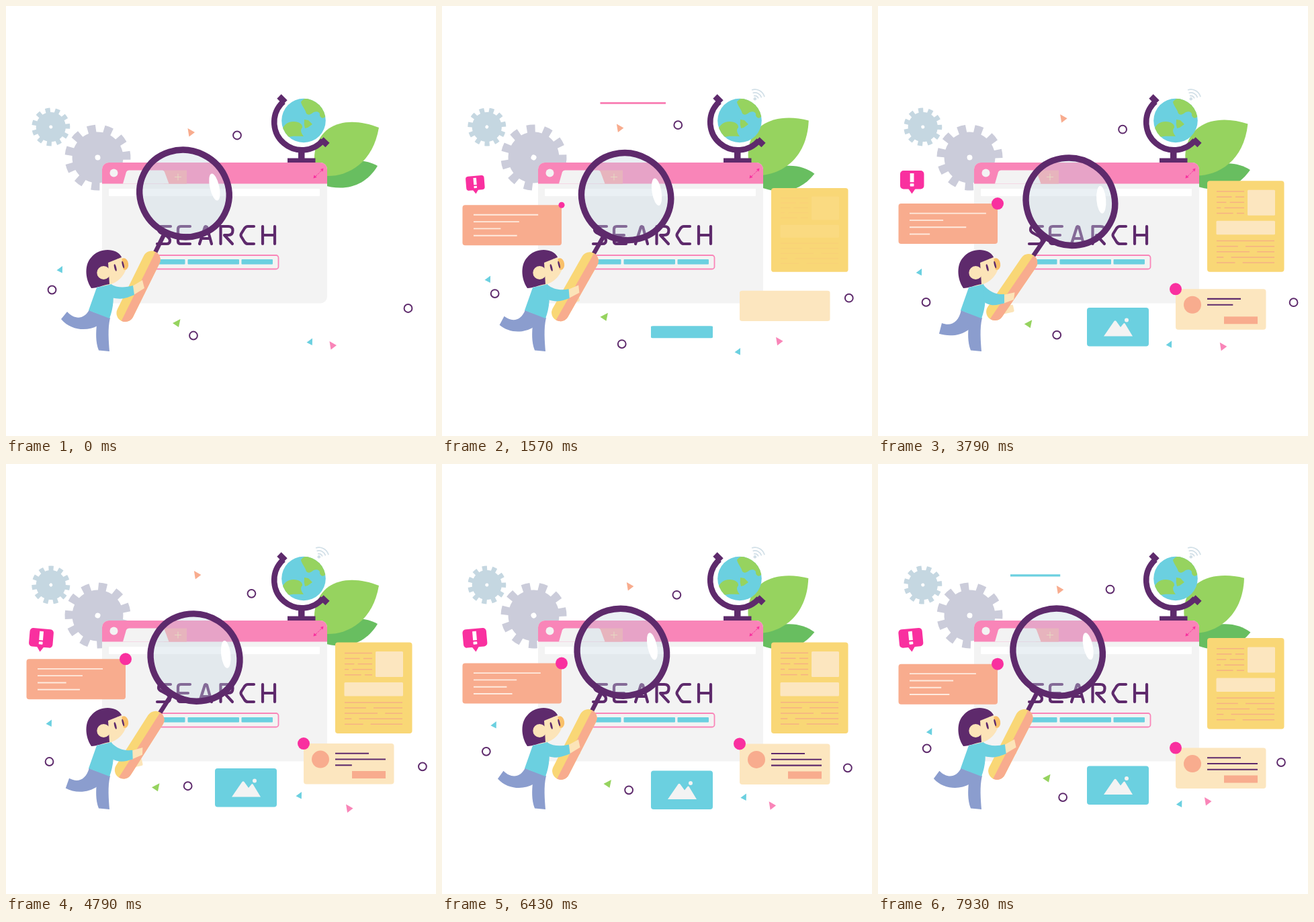
Animation, 640 px wide and 640 px high, one loop 8000 ms. Source, as an HTML page with a canvas:

```html
<!DOCTYPE html>
<html lang="en">
<head>
<meta charset="utf-8">
<title>Search illustration</title>
<style>
html, body { margin: 0; width: 100%; height: 100%; overflow: hidden; background: #fff; }
canvas { display: block; width: 100vw; height: 100vh; }
</style>
</head>
<body>
<canvas id="stage"></canvas>
<script>
// Every cycle is built on the same 2.4 s beat
const LOOP = 8, BEAT = 2.4, SWAY = BEAT * 2, DRIFT = BEAT * 3, TAU = Math.PI * 2;
const PLUM = '#5e2a6c', PINK = '#f985b8', HOT = '#f9309f', CYAN = '#6bd0e0', GREEN = '#96d35f',
  PEACH = '#f8ac8e', YELLOW = '#f9d776', CREAM = '#fce6bf', SKIN = '#fce4b8', PALE = '#f3f3f3',
  MIST = '#c5d7e1', DENIM = '#8b9dce';

const canvas = document.getElementById('stage');
const ctx = canvas.getContext('2d');
const dpr = window.devicePixelRatio || 1;
canvas.width = canvas.height = 640 * dpr;

// Timing helpers
const mix = (a, b, k) => a + (b - a) * k;
const ramp = (t, start, dur) => Math.min(1, Math.max(0, (t - start) / dur));
const ease = (t, start, dur) => { const p = ramp(t, start, dur); return p * p * (3 - 2 * p); };
const wave = (t, peak, period = SWAY) => Math.cos(TAU * (t - peak) / period);

// Smooth closed path through three points, one beat apart
function drift(points, t) {
  const i = Math.floor(t / BEAT), p = t / BEAT - i;
  const from = points[i % 3], to = points[(i + 1) % 3], other = points[(i + 2) % 3];
  const a = 1 - 2.5 * p * p + 1.5 * p ** 3, b = (p + 4 * p * p - 3 * p ** 3) / 2;
  return [0, 1].map(k => a * from[k] + b * to[k] + (1 - a - b) * other[k]);
}

// Drawing helpers
function shape(color, d) { ctx.fillStyle = color; ctx.fill(new Path2D(d)); }
function stroke(color, width, d, cap = 'butt') {
  ctx.strokeStyle = color; ctx.lineWidth = width; ctx.lineCap = cap; ctx.lineJoin = 'round';
  ctx.stroke(new Path2D(d));
}
function arc(color, width, x, y, r, from = 0, to = TAU) {
  ctx.strokeStyle = color; ctx.lineWidth = width; ctx.lineCap = 'butt';
  ctx.beginPath(); ctx.arc(x, y, r, from, to); ctx.stroke();
}
function oval(color, x, y, rx, ry = rx, rot = 0) {
  ctx.fillStyle = color;
  ctx.beginPath(); ctx.ellipse(x, y, rx, ry, rot, 0, TAU); ctx.fill();
}
function box(color, x, y, w, h, r = 0) {
  ctx.fillStyle = color;
  ctx.beginPath(); ctx.roundRect(x, y, w, h, r); ctx.fill();
}
function rule(color, width, x1, x2, y) { if (x2 > x1) stroke(color, width, `M${x1} ${y}H${x2}`); }
function group(draw, x = 0, y = 0, rot = 0, sx = 1, sy = sx) {
  ctx.save(); ctx.translate(x, y); ctx.rotate(rot * Math.PI / 180); ctx.scale(sx, sy);
  draw(); ctx.restore();
}
function faded(alpha, draw) { ctx.globalAlpha = alpha; draw(); ctx.globalAlpha = 1; }

function gear(color, x, y, outer, hole, rot) {
  const teeth = 11, inner = outer * 0.775, root = 0.155, tip = 0.135;
  group(() => {
    ctx.fillStyle = color;
    ctx.beginPath();
    for (let i = 0; i < teeth; i++) {
      const a = i * TAU / teeth - TAU / 4;
      ctx.arc(0, 0, outer, a - tip, a + tip);
      ctx.arc(0, 0, inner, a + root, a + TAU / teeth - root);
    }
    ctx.fill();
    oval('#fff', 0, 0, hole);
  }, x, y, rot);
}

function leaves(t) {
  const lean = 4.85 * (1 - wave(t, 0));
  group(() => shape('#68be60',
    'M93-17C75-27 50-29 20-12L0 3L10 11C45 22 75 13 93-17Z'), 460, 255, lean);
  group(() => shape(GREEN,
    'M89-69C49-85 4-80-6-35C-9-18-6-5 0 2C34 8 79-10 89-69Z'), 466, 250, -lean);
}

function browser() {
  box(PALE, 143, 233, 335, 209.5, 10);
  box(PINK, 143, 233, 335, 31.5, [10, 10, 0, 0]);
  oval(PALE, 160.5, 248.5, 6);
  box('#f9a0a8', 235, 244.5, 34, 20);
  stroke('#f8d8b0', 1, 'M251 254.5h10M256 249.5v10');
  shape(PALE, 'M174 264.5L179 247Q180 244.5 183 244.5H233Q235 244.5 236 247L242.5 264.5Z');
  stroke(HOT, 1, 'M460 254L463 251.5M464 250.5L466 248.5M467 247.5L470 244.5');
  shape(HOT, 'M472.5 241.5L468 243L471.5 246.5ZM457.5 256.5L458.5 251.5L462.5 255Z');
  box('#fff', 153, 272, 314, 11, 1);
  const letters = [
    'M245 328H231Q227 328 227 333Q227 336 231 338L240 343Q244 346 244 349Q244 354 239 354H225',
    'M274 328H260Q256 328 256 332V350Q256 354 260 354H274M258 341H271',
    'M288 354L296 329Q297 327 299 329L306 354M291 346H303',
    'M319.5 354V328H331Q337.5 328 337.5 334Q337.5 341 331 341H325L337 354',
    'M369 328H360Q357 328 355 331L350 339Q349 341 350 343L355 351Q357 354 360 354H369',
    'M382 328V354M400 328V354M382 341H400'
  ];
  letters.forEach(d => stroke(PLUM, 4.2, d, 'round'));
  ctx.strokeStyle = PINK; ctx.lineWidth = 1.8;
  ctx.beginPath(); ctx.roundRect(217, 371, 188.5, 20.5, 3.5); ctx.stroke();
  box(CYAN, 222, 377, 44.5, 7.5, 1);
  box(CYAN, 270.5, 377, 76.5, 7.5, 1);
  box(CYAN, 350.5, 377, 46.5, 7.5, 1);
}

function globe(t) {
  arc(PLUM, 8.5, 440.5, 173, 41.3, 0.71, 3.98);
  stroke(PLUM, 9, 'M406.5 134.5L415.5 143.5M469.5 198.5L478.5 207');
  box(PLUM, 435, 215, 9.5, 12);
  box(PLUM, 419, 226.5, 41.5, 6.5);
  ctx.save();
  ctx.beginPath(); ctx.arc(443, 170.5, 32.8, 0, TAU); ctx.clip();
  box(CYAN, 408, 136, 70, 70);
  shape(GREEN, 'M439 143C444 132 480 132 477 162C474 168 469 168 467 163C468 158 463 156 458 158'
    + 'C452 163 447 163 446 157C444 152 440 148 439 143Z');
  shape(GREEN, 'M411 184C414 176 420 172 428 172C436 172 442 176 441 181C437 185 440 190 443 194C432 194 424 193 419 196Z');
  shape(GREEN, 'M444 169L450 170L456 176L449 181L445 182Q443 176 444 169Z');
  ctx.restore();
  faded(0.8 * ease(t, 0.7, 0.6), () => {
    oval(MIST, 465.8, 138.3, 2.3);
    for (let i = 1; i <= 3; i++) arc(MIST, 1.7, 465.8, 138.8, i * 4.7 + 0.5, -1.9, -0.25);
  });
}

// A panel that unfolds around its middle; contents use its top edge as zero
function panel(color, x, top, w, h, open, draw) {
  group(() => {
    box(color, x, -h / 2, w, h, 4);
    ctx.translate(0, -h / 2);
    draw();
  }, 0, top + h / 2, 0, 1, open);
}

function notePanel(t) {
  const top = 294.7 - 4.4 * wave(t, 0.09);
  panel(PEACH, 30.5, top, 147.5, 60, ease(t, 0.5, 0.6), () => {
    const u = 0.5 + 0.5 * wave(t, 2.38, 1.53), shown = ease(t, 0.8, 0.6);
    const ends = [143 + 19 * u, 115 - 19 * u, 87 + 47 * u, 112 - 37 * u];
    ends.forEach((end, i) => rule('#feebdf', 1.9, 47, mix(47, end, shown), 14.5 + i * 10.3));
  });
  oval(HOT, 178, top, 9 * ease(t, 1.35, 0.44));
}

// Rows of print, each after the first broken by a gap that shifts from row to row
function print(width, y, gap, shift) {
  const left = 504;
  rule('#f6b183', 1.5, left, left + width, y);
  for (let i = 1; i < 5; i++) {
    const x = left + width * gap, row = y + i * 8.1;
    rule('#f6b183', 1.5, left, x, row);
    rule('#f6b183', 1.5, x + width * 0.13, left + width, row);
    gap = (gap + shift + 0.65) % 0.65;
  }
}

function articlePanel(t) {
  panel(YELLOW, 490, 263.4 + 4.4 * wave(t, 0.79), 114.5, 135.5, ease(t, 0.95, 0.75), () =>
    faded(ease(t, 1.4, 0.7), () => {
      box(CREAM, 550, 13.5, 41, 38, 1.5);
      box(CREAM, 503.5, 59.5, 87.5, 20.5, 1.5);
      print(41, 15.8, 0.55, -0.2);
      print(86, 89.3, 0.37, 0.2);
    }));
}

function profilePanel(t) {
  const top = 418.3 - 4.3 * wave(t, 0.78);
  panel(CREAM, 443, top, 134.5, 60.5, ease(t, 1.1, 0.7), () => {
    faded(ease(t, 2, 0.75), () => {
      oval(PEACH, 468, 23.5, 13);
      box(PEACH, 515, 41, 50, 11);
    });
    for (let i = 0; i < 3; i++)
      rule(PLUM, 2.1, 490, 490 + (i ? 75 : 50) * ramp(t, 2.1 + i * 1.18, 1), 14.6 + i * 8.8);
  });
  oval(HOT, 443, top, 9 * ease(t, 2.2, 0.53));
}

function picturePanel(t) {
  panel(CYAN, 311, 453 + 4.1 * wave(t, 1.17), 92, 57.5, ease(t, 1.3, 0.73), () =>
    faded(ease(t, 1.6, 0.6), () => {
      shape(PALE, 'M336 42.5L351.5 20Q353 18.5 354.5 20L361 29L365.5 23.5Q366.5 22.5 367.5 23.5L379 42.5Z');
      oval(PALE, 370, 18.5, 3);
    }));
}

function bubble(t) {
  group(() => {
    box(HOT, -17.5, -34.5, 35.5, 27.5, 5);
    shape(HOT, 'M-5.5-8H5.5L0 0Z');
    box('#fff', -2.8, -30.5, 5.8, 13.2);
    box('#fff', -2.8, -15.2, 5.8, 4.2, 0.8);
  }, 50.5, 279.5, -1.6 + 6.4 * wave(t, 0), ease(t, 1.1, 0.68));
}

// Drifting bits: a resting place and a triangular route from it
const route = (b, c) => [[0, 0], b, c];
const RISE = route([12.7, -20], [21.4, 0.4]), DIP = route([-18, 18], [-16, -6.5]);
const RIGHT = 'M-4.5-6L6 0L-2.5 6.5Z', LEFT = 'M3-5.5L-5.5 0.8L2.8 5Z', WIDE = 'M4.5-6L-7 0L2 6Z';
const rings = [
  { x: 344, y: 192.5, path: RISE },
  { x: 598.5, y: 450, path: RISE },
  { x: 68.5, y: 422.5, path: route([12.7, 10.3], [-4, 20.5]) },
  { x: 279, y: 490.5, path: route([-16, 14.8], [-8.3, -11.3]) }
];
const chips = [
  { x: 275, y: 188, color: PEACH, form: RIGHT, path: route([-12.5, -12], [9.4, -23]) },
  { x: 81, y: 392.5, color: CYAN, form: LEFT, path: DIP },
  { x: 453, y: 500, color: CYAN, form: LEFT, path: DIP },
  { x: 255, y: 472, color: GREEN, form: WIDE, path: route([-21, -10.8], [-31, 9.3]) },
  { x: 486, y: 505, color: PINK, form: RIGHT, path: route([24, -7.2], [24.5, 7.6]) }
];
function confetti(t) {
  for (const bit of [...rings, ...chips]) {
    const [dx, dy] = drift(bit.path, t);
    group(() => bit.form ? shape(bit.color, bit.form) : arc(PLUM, 2, 0, 0, 5.9), bit.x + dx, bit.y + dy);
  }
}

function dashes(t) {
  const dash = (color, y, start) =>
    rule(color, 3.2, mix(197, 333, ease(t, start + 0.45, 1.2)), mix(197, 333, ease(t, start, 0.85)), y);
  dash(PINK, 144.5, 0.7);
  dash(CYAN, 165.8, 7.48);
}

function magnifier(swing) {
  group(() => {
    stroke(PLUM, 6.5, 'M0-105V-55');
    box(YELLOW, -13, -74, 26, 114.6, 13);
    box(PEACH, 0, -74, 13, 114.6, [0, 13, 13, 0]);
    faded(0.37, () => oval(MIST, 0, -171, 65, 62));
    ctx.strokeStyle = PLUM; ctx.lineWidth = 9.4;
    ctx.beginPath(); ctx.ellipse(0, -171, 67.2, 64.2, 0, 0, TAU); ctx.stroke();
    oval('#fff', 36.1, -199.4, 7, 20.5, -0.68);
  }, 189.7, 432.3, 26.3 + 8.2 * swing);
}

function legs(s) {
  const m = (a, b) => mix(a, b, s).toFixed(2);
  shape(DENIM, `M${m(91, 95)} ${m(455, 472)}C${m(102, 108)} ${m(467, 477)} ${m(116, 120)} ${m(467, 472)} 124 452`
    + `L145 466L136 ${m(476, 481)}C${m(122, 122)} ${m(484, 492)} ${m(97, 104)} ${m(484, 492)} ${m(82, 91)} ${m(466, 488)}Z`);
  shape(DENIM, 'M123 453L155 464C151 480 153 500 154 514L138 512.5C133 500 134 485 135 474Z');
}

function head() {
  shape(SKIN, 'M146 404L154 402L157 414L144 417Z');
  shape(PLUM, 'M127 420C117 405 117 384 127 374C138 360 164 359 172 373.5L171 376L154 384L154 414C146 415 135 420 127 420Z');
  shape(SKIN, 'M152 382L172 374C178 378 181 384 179 390C176 402 166 412 154 414.5Z');
  oval('#f9c069', 176.3, 384, 5.8, 8.8, -0.15);
  shape(SKIN, 'M165 377L172 375L175 394L165 398Z');
  oval(SKIN, 145.3, 397, 10);
  oval(PLUM, 162.7, 389.5, 1.5, 5.3, -0.25);
  oval(PLUM, 174.2, 385, 1.3, 5.3, -0.25);
}

function torso(s) {
  const m = (a, b) => mix(a, b, s).toFixed(2);
  shape(CYAN, 'M135 419C143 417 150 416 157 414C162 430 160 450 154 465L123 453Z');
  shape(SKIN, `M${m(188, 186)} ${m(417, 430)}L${m(203, 203.5)} ${m(408, 426.5)}`
    + `L${m(206, 202)} ${m(420, 437)}L${m(190, 186)} ${m(430, 443)}Z`);
  shape(CYAN, `M156 414C${m(166, 167)} ${m(420, 427)} ${m(178, 177)} ${m(419, 430)} ${m(189, 188)} ${m(416, 429)}`
    + `L${m(191, 188)} ${m(430, 442.5)}C${m(180, 178)} ${m(434, 444)} ${m(174, 170)} ${m(438, 449)} 157 ${m(434, 440)}Z`);
}

function render(t) {
  ctx.setTransform(dpr, 0, 0, dpr, 0, 0);
  box('#fff', 0, 0, 640, 640);
  const swing = 0.5 - 0.5 * wave(t, 0, DRIFT);
  const turn = 360 / (DRIFT * 2) * t;

  leaves(t);
  gear(MIST, 66.8, 180, 28.5, 2.5, -10.5 - turn);
  gear('#cbccda', 136.5, 225.5, 49, 4, -12 + turn);
  browser();
  globe(t);
  dashes(t);
  notePanel(t);
  articlePanel(t);
  profilePanel(t);
  picturePanel(t);
  bubble(t);
  confetti(t);
  legs(swing);
  group(() => box(SKIN, -8, -5.5, 16, 11, 2), mix(198, 194, swing), mix(425, 451.5, swing), -12);
  magnifier(swing);
  head();
  torso(swing);
}

const begin = performance.now();
function tick() {
  render(((performance.now() - begin) / 1000) % LOOP);
  requestAnimationFrame(tick);
}
tick();
</script>
</body>
</html>
```
